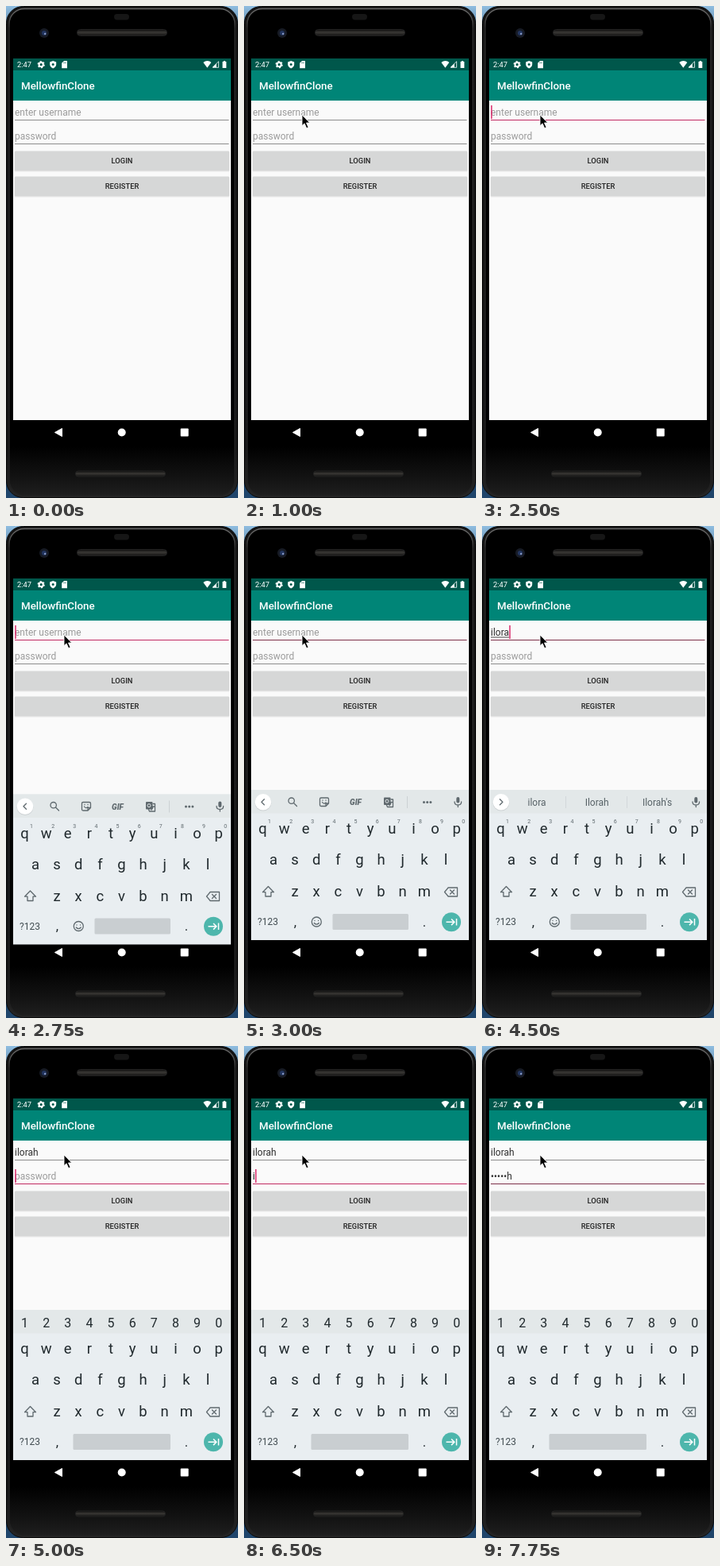
Animation, 292 px wide and 619 px high, one loop 8000 ms. Source, as an HTML page:

```html
<!DOCTYPE html>
<html lang="en">
<head>
<meta charset="utf-8">
<title>Login screen</title>
<style>
html, body { margin: 0; width: 100%; height: 100%; overflow: hidden; background: #000; }
svg { display: block; width: 292px; height: 619px; }
text { font-family: Roboto, sans-serif; white-space: pre; }
.mid { text-anchor: middle; }
.field { font-size: 12px; }
.btn { font-size: 9.33px; font-weight: 500; fill: #222; text-anchor: middle; }
.icon { fill: none; stroke: #5f696e; stroke-width: 1.3; stroke-linecap: round; stroke-linejoin: round; }
</style>
</head>
<body>
<svg viewBox="0 0 292 619">
  <defs>
    <linearGradient id="desk" x1="0" y1="0" x2="0" y2="1">
      <stop offset="0" stop-color="#8fbde0"/><stop offset=".1" stop-color="#2a4a66"/><stop offset="1" stop-color="#1f456b"/>
    </linearGradient>
    <linearGradient id="shell" x1="0" y1="0" x2="0" y2="1">
      <stop offset="0" stop-color="#141414"/><stop offset=".9" stop-color="#141414"/><stop offset="1" stop-color="#262626"/>
    </linearGradient>
    <linearGradient id="face" x1="0" y1="0" x2="0" y2="1">
      <stop offset="0" stop-color="#000"/><stop offset=".9" stop-color="#000"/><stop offset="1" stop-color="#1e1e1e"/>
    </linearGradient>
    <linearGradient id="shine" x1="0" y1="0" x2="0" y2="1">
      <stop offset="0" stop-color="#6c6c6c"/><stop offset=".04" stop-color="#2a2a2a"/><stop offset="1" stop-color="#202020"/>
    </linearGradient>
    <linearGradient id="grille" x1="0" y1="0" x2="0" y2="1">
      <stop offset="0" stop-color="#0a0a0a"/><stop offset=".45" stop-color="#3a3835"/><stop offset="1" stop-color="#121212"/>
    </linearGradient>
  </defs>

  <!-- phone -->
  <rect width="292" height="619" fill="url(#desk)"/>
  <rect x=".5" y=".5" width="291" height="618" rx="21" fill="url(#shell)" stroke="#0a0a0a"/>
  <rect x="4" y="3.500" width="284" height="612" rx="19" fill="url(#face)" stroke="url(#shine)" stroke-width="1.500"/>
  <rect x="136" y="10" width="19" height="7.500" rx="3.700" fill="#161616"/>
  <rect x="89.500" y="29.500" width="113" height="8" rx="4" fill="url(#grille)" stroke="#222"/>
  <rect x="87.500" y="585" width="113" height="7" rx="3.500" fill="url(#grille)" stroke="#222"/>
  <circle cx="48" cy="34" r="6" fill="#171b25"/>
  <circle cx="48" cy="34" r="3" fill="#22355f"/>
  <circle cx="49.200" cy="35" r="1.200" fill="#8c9cc8"/>

  <!-- app -->
  <rect x="9" y="66" width="274" height="455" fill="#fafafa"/>
  <rect x="9" y="66" width="274" height="15.500" fill="#00574b"/>
  <rect x="9" y="81" width="274" height="38" fill="#008577"/>
  <text x="14" y="77" font-size="9.4" fill="#fff">2:47</text>
  <g fill="#fff">
    <circle cx="44.200" cy="73.700" r="2.600" fill="none" stroke="#fff" stroke-width="2"/>
    <circle cx="44.200" cy="73.700" r="4" fill="none" stroke="#fff" stroke-width="1.300" stroke-dasharray="2.1 2.09"/>
    <path d="M59.200 69l4 1.600v3q0 3.200-4 5q-4-1.800-4-5v-3z"/>
    <circle cx="59.200" cy="73.500" r="1.500" fill="#00574b"/>
    <path d="M73 69h4v9.200h-6.800v-6.500z"/>
    <path d="M73 70.500v1.800M75 70.500v1.800" stroke="#00574b" stroke-width=".8"/>
    <path d="M248.300 71q5-4 10 0l-5 6.700z"/>
    <path d="M260 77.300l4.800-4.700v4.700z"/>
    <path d="M260 77.300l7.600-7.500v7.500z" fill="none" stroke="#fff" stroke-width=".8"/>
    <path d="M272.500 70h1.300v-1h2.200v1h1.300v8h-4.800z"/>
  </g>
  <text x="19" y="105" font-size="13.33" font-weight="500" fill="#fff">MellowfinClone</text>

  <line id="line0" x1="11" x2="280.500" y1="143.500" y2="143.500"/>
  <line id="line1" x1="11" x2="280.500" y1="173.500" y2="173.500"/>
  <text id="text0" class="field" x="11" y="138"></text>
  <text id="text1" class="field" x="11" y="168"></text>
  <line id="compose" x1="11" y1="140" y2="140" stroke="#333" stroke-width=".9"/>
  <rect id="caret" width="1.400" height="17" fill="#d81b60"/>

  <g fill="#000" opacity=".07">
    <rect x="10.500" y="183" width="271" height="25.500" rx="1.500"/>
    <rect x="10.500" y="215" width="271" height="25.500" rx="1.500"/>
  </g>
  <rect x="11" y="182.500" width="270" height="24.700" rx="1" fill="#d6d7d7"/>
  <rect x="11" y="214.500" width="270" height="24.700" rx="1" fill="#d6d7d7"/>
  <text class="btn" x="146" y="198.300">LOGIN</text>
  <text class="btn" x="146" y="230.300">REGISTER</text>

  <!-- navigation -->
  <path d="M61.500 536.500l9-5v10z" fill="#fff" stroke="#fff" stroke-linejoin="round"/>
  <circle cx="145.700" cy="536.500" r="5" fill="#fff"/>
  <rect x="219.700" y="531.500" width="10" height="10" rx="1" fill="#fff"/>

  <!-- keyboard -->
  <g id="board">
    <rect x="9" y="332" width="274" height="189" fill="#e9eef1"/>
    <rect x="9" y="332" width="274" height="29.500" fill="#e3e8e9"/>
    <g id="keys" fill="#20292d"></g>
    <g id="sups"></g>
    <g id="digits" fill="#20292d"></g>
    <g id="strip">
      <circle cx="24" cy="348" r="10.500" fill="#ccd1d3"/>
      <circle cx="24" cy="347.300" r="10.300" fill="#fff"/>
      <path id="chevron" class="icon"/>
      <rect x="267.300" y="341" width="4" height="7.500" rx="2" fill="#5f696e"/>
      <path class="icon" d="M265 347q0 4 4.300 4t4.300-4M269.300 351v2.500"/>
    </g>
    <g id="tools">
      <circle class="icon" cx="59.700" cy="345.700" r="3.700"/>
      <path class="icon" d="M62.500 348.500l4 4"/>
      <path class="icon" d="M97 342h8q1.500 0 1.500 1.500v5.500l-3.500 3.500h-6q-1.500 0-1.500-1.500v-7.500q0-1.500 1.500-1.500zM106.500 349h-3.500v3.500M98.500 347.500q2 3 4.500 .500M99 345v.200M103 345v.200"/>
      <text class="mid" x="140.500" y="351" font-size="10" font-weight="900" font-style="italic" fill="#5f696e">GIF</text>
      <rect x="176" y="341.500" width="8.500" height="9.500" rx="1" fill="#5f696e"/>
      <path class="icon" d="M185 344h2.500v9.500h-7l-1-2.500M183.500 347.500h3M185 347.500q0 2-2 4"/>
      <circle cx="180" cy="346.200" r="2" fill="none" stroke="#e3e8e9"/>
      <line x1="205.500" x2="205.500" y1="340" y2="355" stroke="#cbd1d3"/>
      <g fill="#5f696e"><circle cx="226.500" cy="347.500" r="1.500"/><circle cx="230.700" cy="347.500" r="1.500"/><circle cx="234.900" cy="347.500" r="1.500"/></g>
    </g>
    <g id="words" font-size="12" fill="#566166">
      <path d="M105.500 340v15M182.500 340v15" stroke="#d2d8da"/>
      <text class="mid" x="69" y="351.700"></text>
      <text class="mid" x="144.700" y="351.700"></text>
      <text class="mid" x="220.500" y="351.700"></text>
    </g>
    <path class="icon" d="M30.500 453.500l7 7.200h-3.500v5.300h-7v-5.300h-3.500z"/>
    <path class="icon" d="M257 455h11.500v11h-11.500l-4.500-5.500zM259.500 458l5 5M264.500 458l-5 5"/>
    <text class="mid" x="30" y="502.300" font-size="12" fill="#414c51">?123</text>
    <rect id="space" y="488" height="20" rx="1.500" fill="#c9ced1"/>
    <g id="smiley">
      <circle class="icon" cx="91.300" cy="498" r="6"/>
      <path class="icon" d="M89 496.300v.200M93.600 496.300v.200M88.300 499.500q3 3.300 6 0"/>
    </g>
    <circle cx="261" cy="498.300" r="12" fill="#4db6ac"/>
    <path d="M254.500 498.300h10M261 494.500l3.800 3.800l-3.800 3.800M267.500 494v8.600" fill="none" stroke="#fff" stroke-width="1.500"/>
  </g>

  <path id="mouse" d="M0 0v13.700l3.100-2.900l2.600 5.900l2.400-1l-2.600-5.700h4.300z" fill="#000" stroke="#fff" stroke-width=".9"/>
</svg>
<script>
const LOOP = 8000, PITCH = 27.13;
const NAME = 'ilorah', ACCENT = '#c22a62', DULL = '#7d3049', IDLE = '#8c8c8c';
const $ = id => document.getElementById(id);
const set = (el, attrs) => { for (const k in attrs) el.setAttribute(k, attrs[k]); };
const show = (el, on) => set(el, { visibility: on ? 'visible' : 'hidden' });

function label(parent, str, x, y, size, fill) {
  const el = document.createElementNS('http://www.w3.org/2000/svg', 'text');
  set(el, { x, y, 'font-size': size, class: 'mid' });
  if (fill) set(el, { fill });
  el.textContent = str;
  parent.append(el);
}

const row = (parent, str, x, y, size, fill) =>
  [...str].forEach((c, i) => label(parent, c, x + i * PITCH, y, size, fill));

row($('keys'), 'qwertyuiop', 23.5, 387.3, 18.5);
row($('keys'), 'asdfghjkl', 37, 426, 18.5);
row($('keys'), 'zxcvbnm', 64, 466, 18.5);
row($('keys'), ',', 64.5, 503.5, 17);
row($('keys'), '.', 227, 503.5, 17);
row($('sups'), '1234567890', 32, 374, 7, '#5f696e');
row($('digits'), '1234567890', 23.5, 353.5, 16);

// Value in force at time t from [start, value] steps
const at = (steps, t) => steps.reduce((v, [start, next]) => t >= start ? next : v, null);

const mouse = [[500, [221, 173]], [750, [124, 168]], [1000, [73, 137]]];
const caretOn = [[0, 0], [2250, 1], [3000, 0], [3500, 1], [5500, 0], [6000, 1], [7750, 0]];
const userLen = [[0, 0], [4000, 1], [4250, 3], [4500, 5], [4750, 6]];
const passLen = [[0, 0], [6500, 1], [6750, 3], [7000, 5], [7250, 6]];
const lineTone = [[0, IDLE], [2250, ACCENT], [3000, DULL], [5000, ACCENT], [7500, DULL]];
const guesses = [
  [0, ['', '', '']],
  [4000, ['i', 'I', "I'm"]],
  [4250, ['ilo', 'Ilo', 'ill']],
  [4500, ['ilora', 'Ilorah', "Ilorah's"]],
  [4750, ['ilorah', 'Ilorah', "Ilorah's"]]
];
const suggest = $('words').querySelectorAll('text');

function fill(el, value, hint) {
  const str = value || hint;
  if (el.textContent !== str) el.textContent = str;
  set(el, { fill: value ? '#303030' : '#9b9b9b' });
  return value ? el.getComputedTextLength() : 0;
}

function draw(t) {
  const pos = at(mouse, t);
  show($('mouse'), pos);
  if (pos) set($('mouse'), { transform: `translate(${pos})` });

  const n = at(passLen, t);
  const secret = n ? '•'.repeat(n - 1) + NAME[n - 1] : '';
  const widths = [
    fill($('text0'), NAME.slice(0, at(userLen, t)), 'enter username'),
    fill($('text1'), secret, 'password')
  ];

  const focus = t >= 5000 ? 1 : 0;
  [0, 1].forEach(i => set($('line' + i), { stroke: i === focus ? at(lineTone, t) : IDLE }));
  set($('caret'), { x: 11.3 + widths[focus], y: 125 + focus * 30 });
  show($('caret'), at(caretOn, t));

  const typing = t >= 4000 && !focus;
  set($('compose'), { x2: 11 + widths[0] });
  show($('compose'), typing);

  set($('board'), {
    display: t >= 2750 ? 'inline' : 'none',
    transform: `translate(0 ${t < 3000 ? 5.5 : 0})`
  });
  show($('strip'), !focus);
  show($('tools'), !focus && !typing);
  show($('words'), typing);
  show($('sups'), !focus);
  show($('smiley'), !focus);
  show($('digits'), focus);
  set($('space'), focus ? { x: 84.5, width: 122.5 } : { x: 111.5, width: 95.5 });
  set($('chevron'), { d: typing ? 'M22.5 343.8l3.5 3.5l-3.5 3.5' : 'M25.5 343.8l-3.5 3.5l3.5 3.5' });
  at(guesses, t).forEach((w, i) => { suggest[i].textContent = w; });
}

const start = performance.now();
function tick() {
  draw((performance.now() - start) % LOOP);
  requestAnimationFrame(tick);
}
tick();
</script>
</body>
</html>
```
